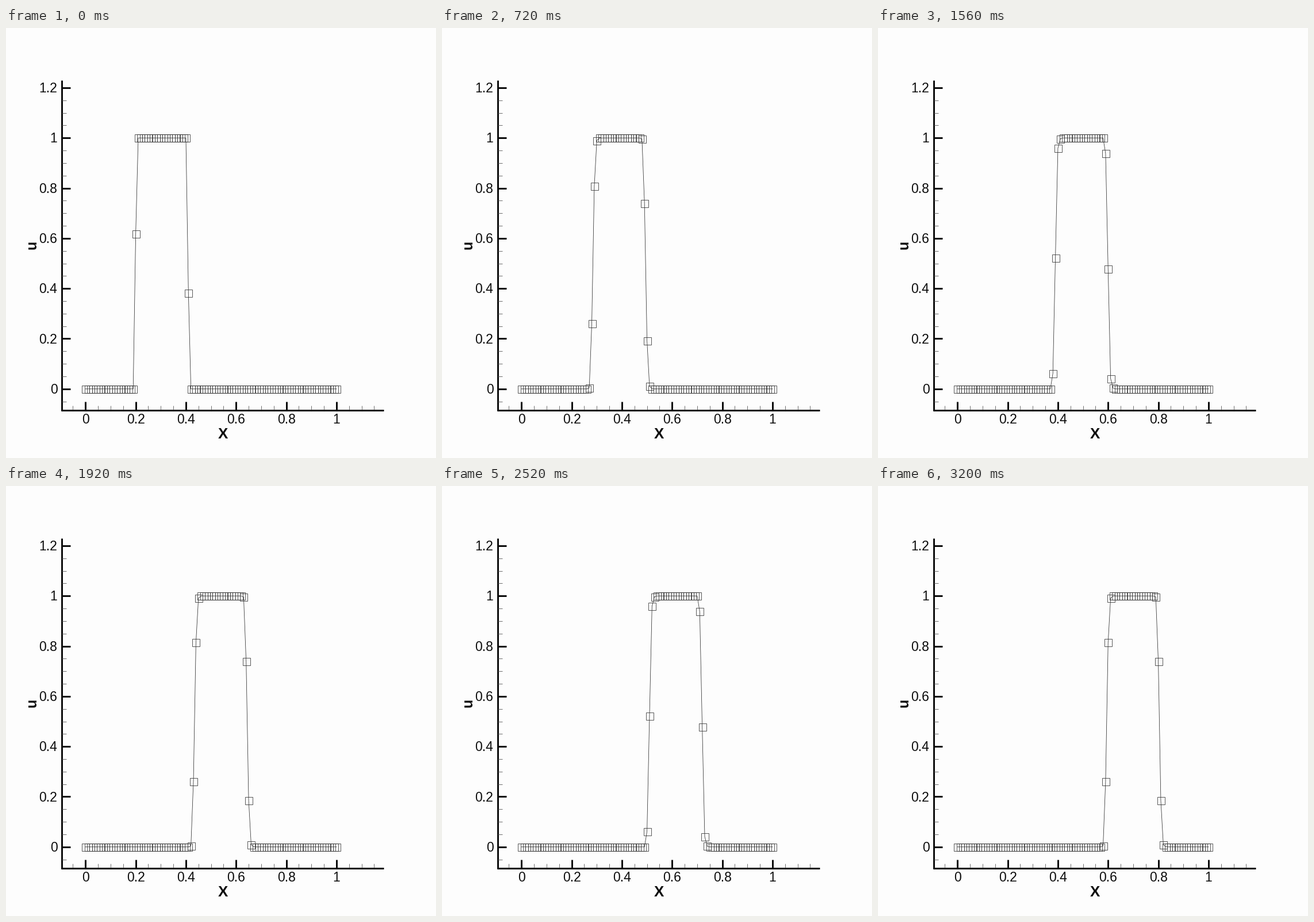
Recreate the animation shown at these times as a matplotlib script. Size 748 px wide and 748 px high, loop 3.24 s.

```python
import numpy as np
import matplotlib.pyplot as plt
from matplotlib.animation import FuncAnimation

SIZE, DPI = 748, 64
PX = 72 / DPI                      # points per pixel
FRAMES, INTERVAL = 81, 40
X0, Y0, UNIT = 138.3, 627.8, 436.6  # pixel origin and scale of the plot
LEFT, BASE = 97.5, 664.5
WIDTH = 21                         # cells between the two edges of the pulse
INK = "#0c0c0c"

plt.rcParams["font.family"] = "Liberation Sans"
fig = plt.figure(figsize=(SIZE / DPI, SIZE / DPI), dpi=DPI, facecolor="#fdfdfd")
ax = fig.add_axes([0, 0, 1, 1])
ax.set_xlim(0, SIZE)
ax.set_ylim(SIZE, 0)
ax.axis("off")


def px(x):
    return X0 + UNIT * x


def py(u):
    return Y0 - UNIT * u


def stroke(xs, ys, width, color=INK):
    ax.plot(xs, ys, color=color, lw=width * PX, solid_capstyle="butt")


def label(x, y, text, size, **kw):
    ax.text(x, y, text, fontsize=size * PX, color=INK, **kw)


def draw_axes():
    stroke([LEFT, LEFT], [91, BASE + 1.5], 3)
    stroke([LEFT - 1.5, 657.5], [BASE, BASE], 3)
    for n in range(-1, 25):
        v = n * 0.05
        major = n % 4 == 0
        reach, width, color = (14.5, 3, INK) if major else (8, 0.8, "#4c4c4c")
        stroke([LEFT, LEFT + reach], [py(v)] * 2, width, color)
        if major:
            label(89.5, py(v) + 8.2, f"{v:.1g}" if v < 1.1 else f"{v:.1f}", 23,
                  ha="right", va="baseline")
        if n < 24:
            stroke([px(v)] * 2, [BASE, BASE - reach], width, color)
            if major:
                label(px(v), 688.3, f"{v:.1g}", 23, ha="center", va="baseline")
    label(377.5, 713.5, "X", 26, ha="center", va="baseline", weight="bold")
    label(45.3, 377.5, "u", 25, ha="center", va="center", weight="bold",
          rotation=90)


def edge(k):
    """First cell of the rising edge and its values, at step k."""
    if k == 0:
        return 20, np.array([0.617])
    lag = 0.025 * np.exp(-0.16 * (k - 10))  # start-up smearing that dies away
    if k % 2:
        values = [0.062, 0.522, 0.959 - 0.5 * lag, 0.997 - 0.15 * lag]
        return 19 + k // 2, np.array(values)
    values = [0.004, 0.261, 0.815 - lag, 0.991 - 0.25 * lag, 0.9995]
    return 18 + k // 2, np.array(values)


def pulse(k):
    start, rise = edge(k)
    u = np.zeros(101)
    u[start:start + WIDTH] = 1
    u[start:start + len(rise)] = rise
    tail = start + WIDTH
    u[tail:tail + len(rise)] = 1 - rise
    return u


draw_axes()
cells = px(np.arange(101) / 100)
curve, = ax.plot([], [], color="#303030", lw=0.8 * PX, marker="s",
                 ms=13 * PX, mfc="none", mec="#303030", mew=0.8 * PX)


def update(k):
    curve.set_data(cells, py(pulse(k)))
    return curve,


anim = FuncAnimation(fig, update, frames=FRAMES, interval=INTERVAL,
                     repeat=True, repeat_delay=0, blit=False)
plt.show()
```
